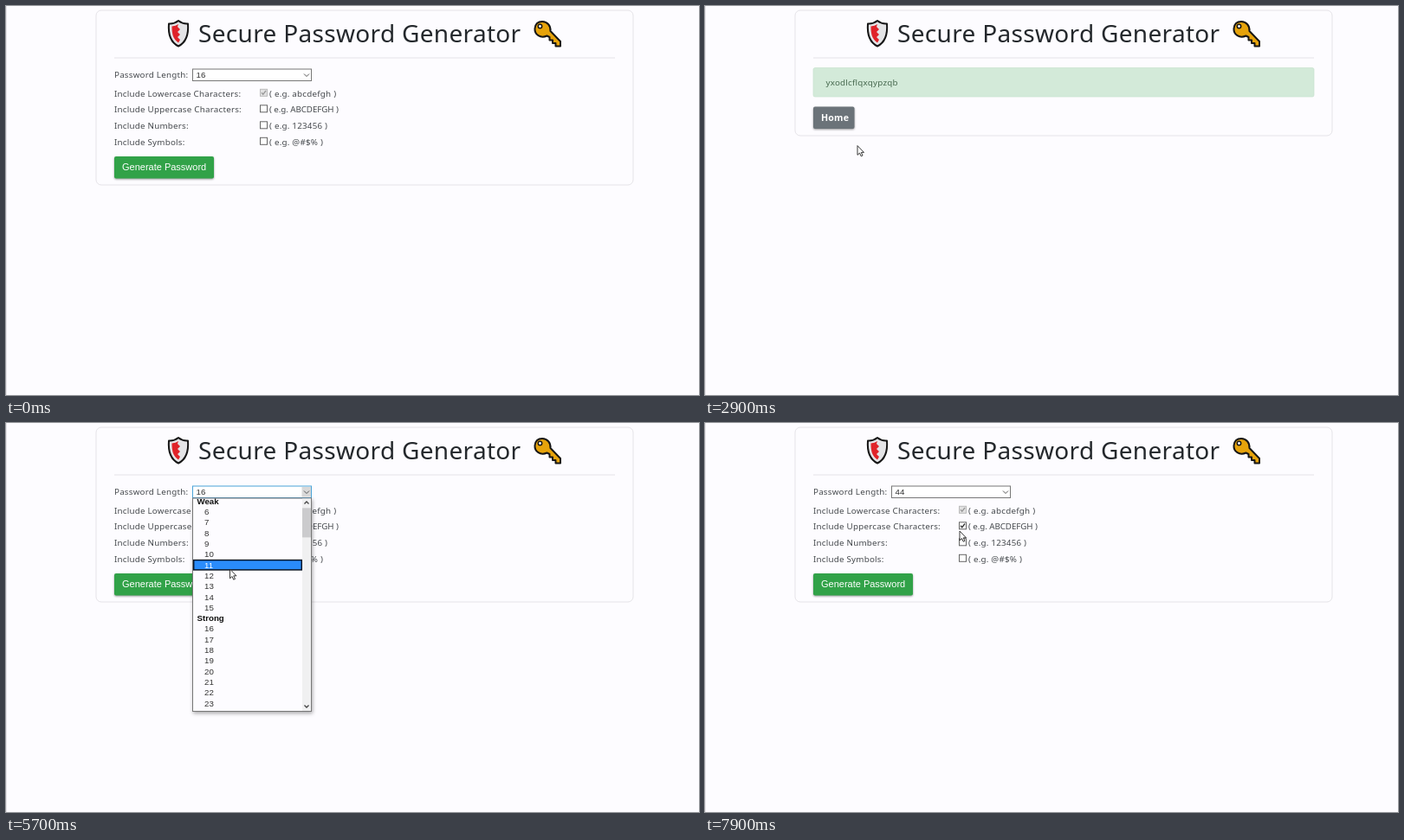
Write an HTML page that moves like this. It is 800 px wide and 450 px high and loops after 8 s.

```html
<!DOCTYPE html>
<html lang="en">
<head>
<meta charset="utf-8">
<title>Secure Password Generator</title>
<style>
html, body { margin: 0; width: 100%; height: 100%; overflow: hidden; background: #fdfcff; }
svg { display: block; }
text { font: 9.8px "Noto Sans", sans-serif; letter-spacing: .22px; fill: #45494d; white-space: pre; }
#title { font-size: 28px; letter-spacing: .32px; fill: #24282c; }
.ui, #rows text { font: 9.7px "Liberation Sans", Arial, sans-serif; letter-spacing: 0; fill: #333; }
#rows .head { font-weight: bold; fill: #111; }
#rows .on { fill: #fff; }
.button { filter: drop-shadow(0 1px 1px #0006); }
.button text { fill: #fff; }
.tight { letter-spacing: -.08px; }
.line { fill: none; stroke: #e5e3e8; }
.tick { fill: none; stroke: #333; stroke-width: 1.3; }
</style>
</head>
<body>
<svg id="stage" width="800" height="450" viewBox="0 0 800 450">
  <rect width="800" height="450" fill="#fdfcff"/>
  <path class="line" d="M.5 0V450M125 60H703"/>
  <rect id="card" class="line" x="104" y="5" width="620" height="202" rx="6"/>

  <g stroke="#161616" stroke-linejoin="round">
    <path d="M199 17Q194 21 188 20.5C187 33 190 42 199 46.500C208 42 211 33 210 20.500Q204 21 199 17Z" fill="#e4e4e6" stroke-width="2"/>
    <path d="M199 21Q196 23 191.500 23.500C191.500 33 193 38 199 42.500L201 39L198 36L201 33L198 30L201 27L198 24Z" fill="#e02329" stroke="none"/>
    <path d="M619 18C625 18 629 23 628.500 29L640 41V46.500H634.500V43H631V39.500H627.500V36L624.500 34.500C617 38 610 33 610.500 26C611 21 614 18 619 18Z" fill="#e6a30b" stroke-width="2"/>
    <circle cx="616.500" cy="23.500" r="2.200" fill="#fdfcff" stroke-width="1.500"/>
  </g>
  <text id="title" x="222" y="42">Secure Password Generator</text>

  <g id="form">
    <text x="125" y="83">Password Length:</text>
    <rect id="select" x="215.500" y="73" width="137" height="13.500" fill="#fff"/>
    <rect id="arrowBox" x="341.500" y="74" width="10.500" height="11.500" fill="#d9d9d9"/>
    <path d="M344 78.500L347 81.500L350 78.500" fill="none" stroke="#555"/>
    <text id="length" class="ui" x="219.500" y="83.300"></text>
    <g id="options"></g>
    <g class="button">
      <rect id="generate" x="125" y="174" width="115" height="25.500" rx="2"/>
      <text class="ui" x="134" y="190" style="font-size:11px;fill:#fff">Generate Password</text>
    </g>
  </g>

  <g id="result">
    <rect x="125" y="71.500" width="578" height="33.500" rx="2" fill="#d3ead9" stroke="#c7e3cf" stroke-width=".7"/>
    <text x="139.500" y="91.500" style="fill:#47694f">yxodlcflqxqypzqb</text>
    <g class="button">
      <rect id="home" x="125" y="116.500" width="47.500" height="25.500" rx="2"/>
      <text x="134" y="133" style="font-size:10.600px;font-weight:600">Home</text>
    </g>
  </g>

  <g id="list">
    <rect x="215.500" y="87" width="137" height="246.500" fill="#fdfcff" stroke="#777" style="filter:drop-shadow(1px 2px 2px #0005)"/>
    <svg x="216" y="87.500" width="126" height="245.500" viewBox="216 87.500 126 245.500">
      <g id="rows"><rect id="mark" x="216.700" width="124.600" height="11.300" fill="#2a8cfb" stroke="#0b1626" stroke-width="1.500"/></g>
    </svg>
    <rect x="342" y="87.500" width="10" height="245.500" fill="#f0f0f1"/>
    <rect id="thumb" x="342" width="10" height="34" fill="#cbcbcd"/>
    <path d="M344.500 93.500L347 91L349.500 93.500M344.500 326.500L347 329L349.500 326.500" fill="none" stroke="#444" stroke-width="1.300"/>
  </g>

  <g id="cursor" fill="#fff" stroke="#222" stroke-width=".9" stroke-linejoin="round">
    <path id="arrow" d="M0 0V10.800L2.500 8.500L4.200 12.200L6 11.400L4.300 7.800H7.500Z"/>
    <path id="hand" d="M-1.300 9V1.200Q-1.300 0 0 0T1.300 1.200V5.500Q2.500 4.800 3.600 6Q4.800 5.300 5.600 6.600Q7 6.200 7 8V11.500L5.500 14V16H-.5V14.500L-4.600 9.800Q-4.600 8 -3 8.300Z"/>
  </g>
</svg>
<script>
const $ = id => document.getElementById(id);
const LOOP = 8000, ROW = 12.3, TOP = 87;

const options = [
  ["Lowercase", "abcdefgh", 104.5], ["Uppercase", "ABCDEFGH", 123],
  ["", "123456", 142], ["", "@#$%", 160.5]
];
$("options").innerHTML = options.map(([kind, sample, y], i) => {
  const label = kind ? kind + " Characters" : i === 2 ? "Numbers" : "Symbols";
  const tick = i < 2 ? `<path id="tick${i}" class="tick" d="M295 ${y - 4.3}l1.800 2l3.200 -4.200" ${i ? "" : 'style="stroke:#999"'}/>` : "";
  return `<text x="125" y="${y}">Include ${label}:</text>
    <rect x="293.500" y="${y - 8.2}" width="8" height="8" fill="${i ? "#fff" : "#e2e2e2"}" stroke="${i ? "#666" : "#bbb"}"/>${tick}
    <text x="304" y="${y}" class="${i === 1 ? "tight" : ""}">( e.g. ${sample} )</text>`;
}).join("");

const names = i => i === 0 ? "Weak" : i === 11 ? "Strong" : i < 11 ? i + 5 : i + 4;
const rows = Array.from({ length: 125 }, (_, i) => {
  const row = document.createElementNS("http://www.w3.org/2000/svg", "text");
  const name = names(i), head = isNaN(name);
  row.textContent = name;
  row.setAttribute("x", head ? 220.5 : 229);
  row.setAttribute("y", TOP + ROW * (i + .5) + 3.4);
  row.classList.toggle("head", head);
  return $("rows").appendChild(row);
});

// Pointer stops: time, x, y
const path = [
  [100, 262, 440], [500, 222, 290], [900, 188, 188], [1600, 188, 188],
  [2100, 228, 240], [2400, 226, 238], [3100, 156, 131], [3800, 156, 131],
  [4100, 200, 190], [4300, 262, 209], [4500, 350, 160], [4700, 285, 92],
  [5000, 251.5, 83.5], [5300, 251.5, 83.5], [5700, 258.5, 169], [6100, 258.5, 176],
  [6800, 258.5, 176], [7300, 294, 125], [8000, 294, 125]
];

function pointer(t) {
  const i = Math.max(1, path.findIndex(p => p[0] >= t));
  const [a, b] = [path[i - 1], path[i]];
  const k = (t - a[0]) / (b[0] - a[0]);
  return [a[1] + (b[1] - a[1]) * k, a[2] + (b[2] - a[2]) * k];
}

const show = (id, on) => $(id).style.display = on ? "" : "none";
const set = (id, name, value) => $(id).setAttribute(name, value);
const within = (t, from, to) => t >= from && t < to;

function draw(t) {
  const [x, y] = pointer(t);
  const result = within(t, 1300, 3300), open = within(t, 5200, 6500);
  // The hand shape stays until the pointer moves again
  const overHome = within(t, 1700, 3900) && x > 125 && x < 173 && y > 117 && y < 142;
  const overGenerate = !within(t, 1700, 3900) && x > 125 && x < 240 && y > 174 && y < 200;

  show("form", !result);
  show("result", result);
  set("card", "height", result ? 145 : 202);
  set("generate", "fill", overGenerate ? "#258a3c" : "#31a248");
  set("home", "fill", overHome ? "#5a6268" : "#6b7379");

  const active = within(t, 4800, 6500);
  set("select", "stroke", active ? "#4aa3d8" : "#777");
  show("arrowBox", active);
  $("length").textContent = t < 6500 ? 16 : 44;
  show("tick1", t >= 7500);

  show("list", open);
  if (open) {
    const scroll = 2.7 + 408.2 * Math.min(1, Math.max(0, (t - 5700) / 400));
    const lag = t > 5700 && t < 6200 ? 3 : 0;
    const current = t <= 5300 ? 12 : Math.max(1, Math.floor((y - TOP + scroll) / ROW) - lag);
    set("rows", "transform", `translate(0 ${-scroll})`);
    set("mark", "y", TOP + ROW * current + .5);
    set("thumb", "y", 98 + scroll * .138);
    rows.forEach((row, i) => row.classList.toggle("on", i === current));
  }

  show("cursor", t >= 100);
  set("cursor", "transform", `translate(${x} ${y})`);
  show("hand", overHome || overGenerate);
  show("arrow", !overHome && !overGenerate);
}

function tick() {
  draw(Math.floor(performance.now() % LOOP / 100) * 100);
  requestAnimationFrame(tick);
}
tick();
</script>
</body>
</html>
```
